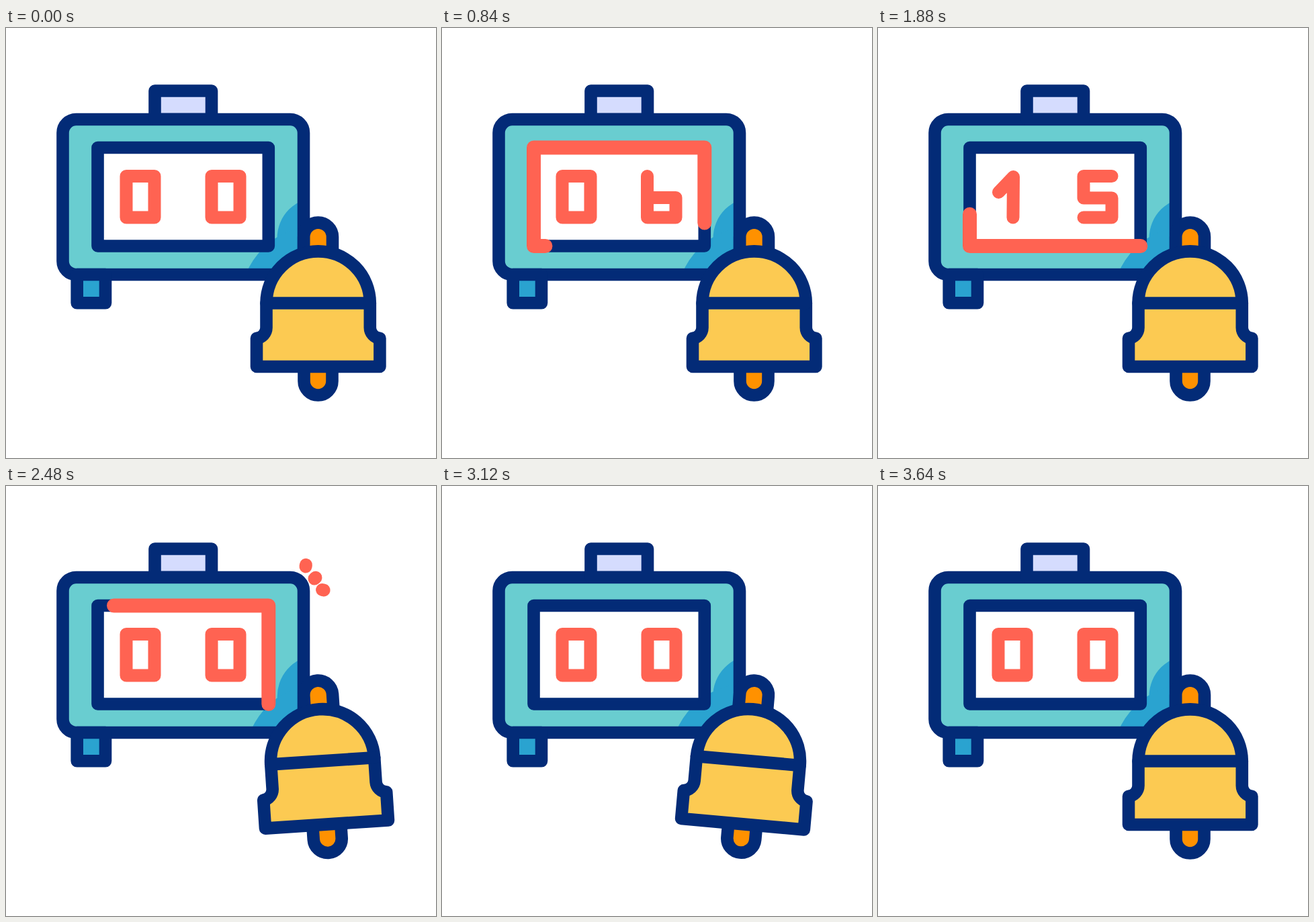
An HTML page for the animation above (4 s loop, 640x640 px).

```html
<!DOCTYPE html>
<html lang="en">
<head>
<meta charset="utf-8">
<title>Alarm clock</title>
<style>
  html, body { margin: 0; width: 100%; height: 100%; overflow: hidden; background: #fff; }
  svg { display: block; width: 100vw; height: 100vh; }
  .line { stroke: #032b77; stroke-width: 18.6; stroke-linejoin: round; stroke-linecap: round; }
  .red { fill: none; stroke: #ff6352; stroke-width: 19; stroke-linejoin: round; stroke-linecap: round; }
  .teal { fill: #69cdd0; }
  .blue { fill: #2aa3d0; }
  .lilac { fill: #d5dcfe; }
  .white { fill: #fff; }
  .yellow { fill: #fcca52; }
  .orange { fill: #ff9100; }
  .none { fill: none; }
  #trail { stroke-width: 21; }
</style>
</head>
<body>
<svg viewBox="0 0 640 640">
  <clipPath id="case"><rect x="84.5" y="136" width="358.5" height="231" rx="20"/></clipPath>

  <rect class="teal" x="84.5" y="136" width="358.5" height="231" rx="20"/>
  <g clip-path="url(#case)">
    <g class="blue swing">
      <circle cx="464.5" cy="313" r="61"/>
      <circle cx="464.5" cy="410" r="116"/>
    </g>
  </g>
  <rect class="line none" x="84.5" y="136" width="358.5" height="231" rx="20"/>
  <rect class="line lilac" x="221.5" y="93.5" width="84.5" height="42.3"/>
  <rect class="line blue" x="105.7" y="367" width="42.3" height="42.3"/>
  <rect class="line white" x="136.5" y="178" width="254.3" height="146.5"/>

  <path class="red" id="tens"/>
  <path class="red" id="units" transform="translate(127 0)"/>
  <path class="red" id="trail" pathLength="100" d="M390.8 324.5H136.5V178H390.8Z"/>

  <g class="red" id="rays">
    <path pathLength="100" d="M446 120L456 57.5"/>
    <path pathLength="100" d="M459 138L505 98"/>
    <path pathLength="100" d="M470.5 154.5L532 166"/>
  </g>

  <g class="line swing">
    <path class="orange" d="M443.2 333V311a21.4 21.4 0 0 1 42.8 0V333"/>
    <path class="orange" d="M443.5 504V525.5a21 21 0 0 0 42 0V504"/>
    <path class="yellow" d="M387.5 409.5a77 77 0 0 1 154.3 0V446a16 16 0 0 0 14.6 15.8V504H373V461.8A16 16 0 0 0 387.5 446Z"/>
    <path d="M387.5 409.5H541.8"/>
  </g>
</svg>
<script>
const LOOP = 4000, FRAME = 40;
const $ = id => document.getElementById(id);
const swingers = document.querySelectorAll('.swing');
const rays = [...$('rays').children];

const DIGITS = [
  'M179 220.5H221V282H179Z',
  'M179.5 244.5L201.5 221.5L201 282',
  'M179 220.5H221V252.5H179V282H221',
  'M179 220.5H221V282H179M179 252.5H221',
  'M179 220.5V252.5H221M221 220.5V282',
  'M221 220.5H179V253H221V282H179',
  'M178.5 220.5V282H221V252.5H179',
  'M179 220.5H221V282',
  'M179 220.5H221V282H179ZM179 252.5H221',
  'M221 252.5H179V220.5H221V282'
];

// Eased 0..1 progress of t between two times
function ease(t, from, to) {
  const x = Math.min(1, Math.max(0, (t - from) / (to - from)));
  return x * x * (3 - 2 * x);
}

// Shows only the part of a path between two fractions of its length
function trim(path, a, b) {
  const on = b > a;
  path.style.visibility = on ? 'visible' : 'hidden';
  if (!on) return;
  path.style.strokeDasharray = b - a >= 1 ? 'none' : `${(b - a) * 100} 300`;
  path.style.strokeDashoffset = -a * 100;
}

function drawTime(t) {
  const n = Math.max(0, Math.floor((t - 40) / 120));
  const hour = n < 20 ? n : 0;
  $('tens').setAttribute('d', DIGITS[Math.floor(hour / 10)]);
  $('units').setAttribute('d', DIGITS[hour % 10]);
}

function drawTrail(t) {
  const u = t < 1480 ? t : t - 1480;
  trim($('trail'), ease(u, 480, 1480), ease(u, 0, 960));
}

function drawRays(t) {
  const u = t - (t < 3120 ? 2440 : 3120);
  for (const ray of rays) trim(ray, ease(u, 200, 520), ease(u, 0, 320));
}

function bellAngle(t) {
  const step = 120, last = 8;
  const key = k => k <= 0 || k >= last ? 0 : k % 2 ? -5.1 : 5.1;
  const k = Math.floor((t - 2400) / step);
  const from = 2400 + k * step;
  return key(k) + (key(k + 1) - key(k)) * ease(t, from, from + step);
}

function render(t) {
  drawTime(t);
  drawTrail(t);
  drawRays(t);
  const turn = `rotate(${bellAngle(t)} 464.5 310)`;
  for (const el of swingers) el.setAttribute('transform', turn);
}

const start = performance.now();
function tick() {
  const t = Math.max(0, performance.now() - start) % LOOP;
  render(Math.floor(t / FRAME) * FRAME);
  requestAnimationFrame(tick);
}
tick();
</script>
</body>
</html>
```
